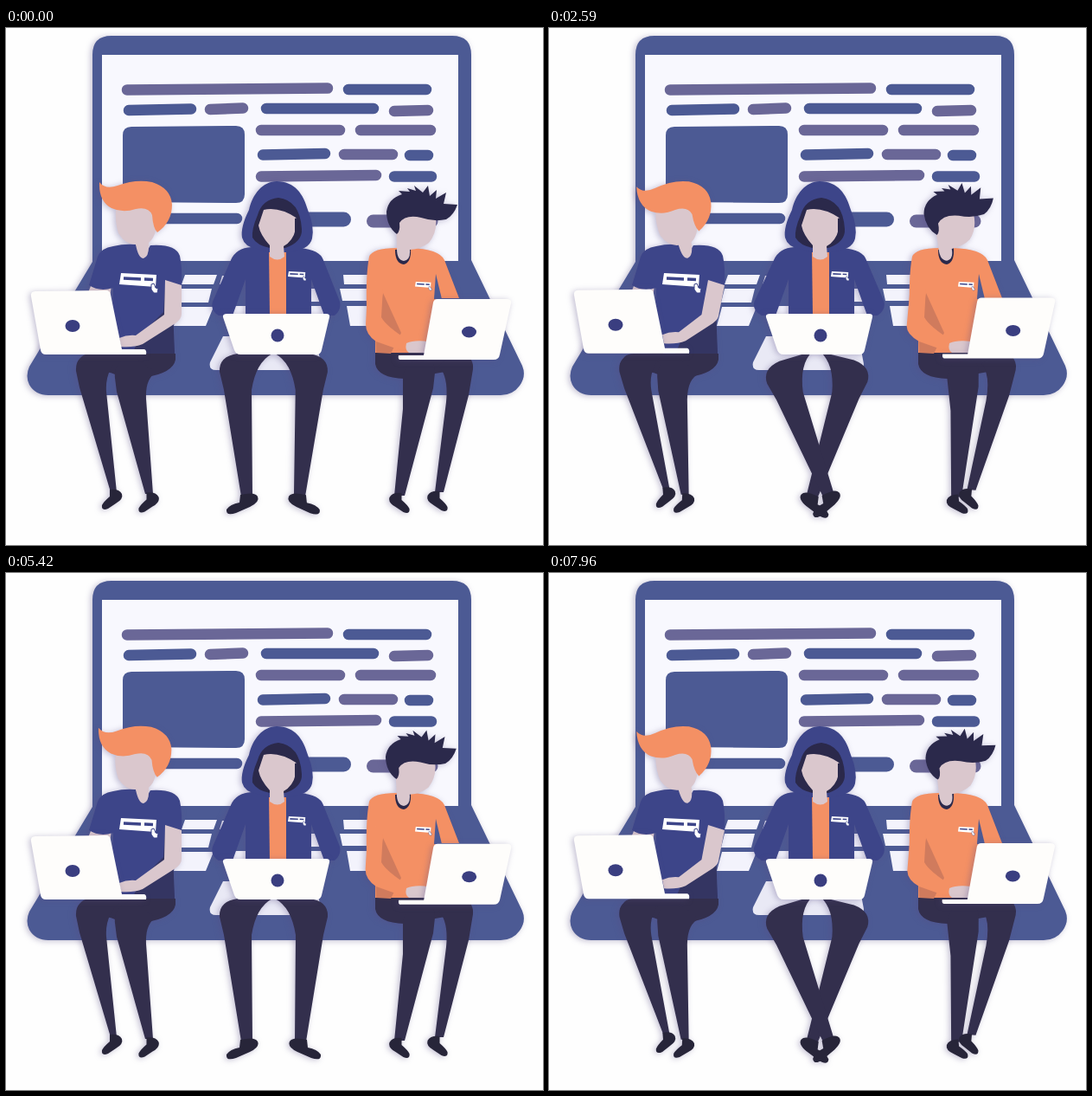
An HTML page that plays this animation: 621x597 px, repeating every 8000 ms.

```html
<!DOCTYPE html>
<html lang="en">
<head>
<meta charset="utf-8">
<title>Three coders on a laptop</title>
<style>
  html, body { margin: 0; width: 100%; height: 100%; overflow: hidden; background: #fefefe; }
  svg { display: block; width: 100vw; height: 100vh; }
  .frame { fill: #4c5a94; }
  .bars { fill: none; stroke: #4c5a94; stroke-width: 12.5; stroke-linecap: round; }
  .bars .soft { stroke: #6a6797; }
  .pants { fill: #332f4d; }
  .shoe { fill: #272539; }
  .skin { fill: #dac7cd; }
  .navy { fill: #3d4589; }
  .orange { fill: #f49064; }
  .dark { fill: #2b294b; }
  .lid { fill: #fefdfb; }
  .disc { fill: #3a3e80; }
  .keys { fill: #f3f3fc; }
  .shadow { filter: drop-shadow(-2px 1px 3.5px rgba(85, 75, 130, .36)); }
</style>
</head>
<body>
<svg viewBox="0 0 621 597" preserveAspectRatio="none">
  <defs>
    <path id="shoe" class="shoe" d="M120 533 Q131 532 134 538 Q136 544 127 549 L118 555 Q110 558 111 551 Q113 547 120 541Z"/>
    <g id="badge">
      <path fill="#fff" d="M2 0 L43 2 L42 16 L0 13Z"/>
      <path stroke="#3d4589" stroke-width="3.5" d="M5 6 L25 7 M29 7 L39 7.5"/>
      <path fill="#fff" stroke="#3d4589" d="M37 13 L40 12 L42 17 L45 18 L44 23 L40 23 L37 19Z"/>
    </g>
    <g id="midLeg">
      <path class="pants" d="M247 397 Q246 379 268 376 H308 Q289 386 284 418 L285 541 H272 L252 418Z"/>
      <path class="shoe" d="M271 539 Q288 535 291 541 Q294 547 282 553 L266 560 Q254 564 255 556 Q259 550 270 548Z"/>
    </g>
  </defs>

  <g class="shadow">
    <path class="frame" d="M100 270 V31 Q100 9 122 9 H516 Q538 9 538 31 V268 L597 390 Q602 402 594 413 Q586 424 572 424 H49 Q34 424 27 412 Q22 402 27 391Z"/>
  </g>
  <path fill="#f8f8fe" d="M111 31 H523 V269 H111Z"/>
  <path class="frame" d="M145 114 L266 113 Q276 113 276 123 V192 Q276 202 266 202 L145 201 Q135 201 135 191 V124 Q135 114 145 114Z"/>
  <g class="bars">
    <path d="M396 71 H486 M142 95 L214 93.500 M301 93 H425 M297 146.500 L369 145 M467 147 H488 M449 171.500 H492 M180 220 H267"/>
    <path class="soft" d="M140 71.500 L372 69.500 M236 94 L274 92.500 M449 96 L488 95 M295 118 H386 M410 118 H491 M391 146 H447 M295 171.500 L428 170"/>
    <path stroke-width="17" d="M340 221 H390.500"/>
    <path class="soft" stroke-width="15" d="M424.500 223 H492"/>
  </g>
  <g class="keys">
    <path d="M207 285 H244 L240 296 H203Z M203 301 H238 L234 317 H199Z M200 322 H240 L231 344 H194Z"/>
    <path d="M250 286 H262 L259 296 H247Z M258 321 H284 V332 H255Z M346 301 H380 V316 H346Z M346 321 H376 V332 H346Z"/>
    <path d="M390 285 H418 V296 H391Z M386 301 H418 V315 H389Z M394 321 H418 V344 H398Z"/>
    <path fill="#e9e9f5" d="M251 356 H358 L364 388 Q364 395 357 395 H243 Q234 395 236 386Z"/>
  </g>

  <!-- left coder -->
  <g class="shadow">
    <path class="pants" d="M84 390 Q84 376 98 376 H196 V383 Q193 398 163 403 L126 400 Q115 394 110 402Z"/>
    <g id="leftLegA">
      <path class="pants" d="M81 396 Q80 378 98 377 H136 Q114 393 116 420 L128 536 H121 L85 415Z"/>
      <use href="#shoe"/>
    </g>
    <g id="leftLegB">
      <path class="pants" d="M126 404 Q124 386 145 378 L174 398 Q161 404 162 428 L170 538 H161 L128 420Z"/>
      <use href="#shoe" x="42.500" y="3.500"/>
    </g>
    <path class="skin" d="M100 293 L122 297 L120 312 L94 308Z"/>
    <path class="navy" d="M124 252 Q136 249 150 250 Q158 268 167 251 Q196 249 201 263 Q204 277 203 298 L190 302 L195 376 H132 L123 326 L124 300 Q108 305 96 297 L106 264 Q110 254 124 252Z"/>
    <path fill="#343562" d="M184 298 L182 328 L156 354 L146 376 H195 L192 298Z"/>
    <use href="#badge" x="131" y="283"/>
    <path class="skin" id="leftArm"/>
    <g id="leftHead">
      <path class="skin" d="M127 210 Q150 202 170 211 L173 234 Q171 243 165 248 Q166 264 159 266 Q153 266 150 250 Q138 250 130 237 Q126 225 127 210Z"/>
      <path class="orange" d="M108 178 Q115 187 129 182 Q150 174 169 178 Q191 185 192 204 Q192 224 175 236 Q170 231 169 216 Q165 206 150 209 Q135 214 122 208 Q107 200 108 178Z"/>
    </g>
  </g>
  <g id="leftLaptop" class="shadow">
    <path class="lid" d="M34 304 L116 303 Q120 303 121 308 L134 371 H160 Q163 372 162 377 H46 Q41 377 40 372 L29 310 Q28 304 34 304Z"/>
    <ellipse class="disc" cx="77" cy="344" rx="8.500" ry="7"/>
  </g>

  <!-- middle coder -->
  <g class="shadow">
    <g transform="translate(619 0) scale(-1 1)"><use href="#midLeg" id="midLegB"/></g>
    <use href="#midLeg" id="midLegA"/>
    <path class="navy" id="jacket"/>
    <path class="orange" d="M304 258 H324 V332 H305Z"/>
    <path class="navy" d="M313 177 C297 177 285 192 281 210 Q271 230 273 242 Q276 253 290 255 L304 259 H324 Q351 257 354 243 Q357 230 349 210 C344 192 334 177 313 177Z"/>
    <path class="dark" d="M315 196 Q296 198 291 216 Q284 232 285 242 Q290 251 305 254 H323 Q343 247 342 232 Q340 199 315 196Z"/>
    <path class="skin" d="M298 210 Q316 206 337 220 L335 232 Q332 246 321 252 L322 264 Q314 271 305 264 V251 Q294 239 292 228Z"/>
    <path class="dark" d="M334 220 L339 218 L338 235 L334 235Z"/>
  </g>
  <use href="#badge" transform="translate(326 281) scale(.47)"/>
  <g class="shadow">
    <path class="lid" d="M256 330 H370 Q375 330 374 334 L365 372 Q364 377 359 377 H271 Q266 377 264 372 L251 334 Q250 330 256 330Z"/>
    <circle class="disc" cx="314" cy="355" r="7.500"/>
  </g>

  <!-- right coder -->
  <g class="shadow">
    <path class="pants" d="M427 374 H525 Q540 378 540 392 L508 397 L461 405 Q430 404 427 388Z"/>
    <g id="rightLegA">
      <path class="pants" d="M459 402 Q462 386 482 379 Q497 384 496 398 L494 416 L461 540 H449 L459 440Z"/>
      <use href="#shoe" transform="translate(577.500 4) scale(-1 1)"/>
    </g>
    <g id="rightLegB">
      <path class="pants" d="M500 390 Q510 379 526 379 Q541 382 540 394 L535 424 L506 536 H496 L509 432 Q512 402 500 390Z"/>
      <use href="#shoe" transform="translate(621.500 2) scale(-1 1)"/>
    </g>
    <path class="orange" d="M451 254 Q424 254 420 264 Q416 285 417 322 L427 340 V375 H490 L500 312 H524 L507 268 Q501 255 467 254Z"/>
    <path class="frame" d="M497 284 L504 313 H495Z"/>
    <path fill="#d07b5d" d="M436 306 L457 352 L445 376 L428 375 L427 350Z"/>
    <path class="orange" id="rightArm"/>
    <path class="skin" d="M463 364 Q472 360 488 362 L486 375 H466 Q461 372 463 364Z"/>
    <path class="dark" d="M450 256 Q450 272 460 273 Q469 271 468 254Z"/>
    <use href="#badge" transform="translate(473 293) scale(.43)"/>
    <g id="rightHead">
      <path class="skin" d="M451 220 Q475 212 497 219 Q499 236 489 248 Q480 255 467 256 Q468 268 460 269 Q452 268 452 255Z"/>
      <path class="dark" d="M452 238 Q440 229 440 212 Q442 197 458 192 L454 188 L467 189 L464 185 L474 188 L472 182 L482 190 L488 182 L490 194 L498 187 L497 197 L509 190 L506 203 L522 204 Q518 216 509 221 Q495 224 480 219 Q462 215 455 225 Q456 235 452 238Z"/>
    </g>
  </g>
  <g id="rightLaptop" class="shadow">
    <path class="lid" d="M499 313 H579 Q585 313 584 318 L571 377 Q570 383 564 383 H456 Q453 383 454 378 H483 L494 317 Q495 313 499 313Z"/>
    <ellipse class="disc" cx="535.500" cy="351" rx="8.500" ry="6.500"/>
  </g>
</svg>
<script>
const LOOP = 8000, HEAD_CYCLE = 6000, LEG_CYCLE = 5400;
const byId = id => document.getElementById(id);
const setTransform = (id, value) => byId(id).setAttribute('transform', value);
const setPath = (id, value) => byId(id).setAttribute('d', value);

// Eased value of a cyclic list of [time, value] keys
function track(time, cycle, keys) {
  const t = time % cycle;
  const next = keys.findIndex(key => key[0] > t);
  if (next < 0) return keys[keys.length - 1][1];
  if (next === 0) return keys[0][1];
  const [t0, v0] = keys[next - 1], [t1, v1] = keys[next];
  const u = (t - t0) / (t1 - t0);
  return v0 + (v1 - v0) * u * u * (3 - 2 * u);
}

// Swings a leg about its knee so that the foot moves by dx pixels
const swing = (id, dx, x, y) => setTransform(id, `rotate(${-dx * .382} ${x} ${y})`);

function draw(t) {
  const leftTilt = track(t, HEAD_CYCLE, [[0, 0], [2100, 1], [3600, 1], [6000, 0]]);
  const rightTilt = track(t, HEAD_CYCLE, [[0, 0], [3700, 1], [5900, 0]]);
  const crossA = track(t, HEAD_CYCLE, [[0, 0], [1350, 1], [2600, 1], [3770, 0]]);
  const crossB = track(t + 100, HEAD_CYCLE, [[0, 0], [1000, 1], [2700, 1], [3870, 0]]);
  const leftSway = track(t, LEG_CYCLE, [[0, 0], [1050, 1], [3620, .9], [4650, 0]]);

  setTransform('leftHead', `rotate(${-5.5 * leftTilt} 158 252)`);
  setTransform('rightHead', `rotate(${-9 * rightTilt} 458 266)`);

  swing('leftLegA', track(t, LEG_CYCLE, [[0, 0], [2600, 12], [3200, 12], [4700, 0]]), 98, 390);
  swing('leftLegB', -9 * leftSway, 145, 390);
  swing('rightLegA', track(t, LEG_CYCLE, [[0, 0], [2000, 16], [2900, 16], [5400, 0]]), 480, 390);
  swing('rightLegB', track(t, LEG_CYCLE, [[0, 0], [700, 4], [2450, -13], [2900, -13], [5400, 0]]), 525, 390);

  setTransform('midLegA', `translate(${3 * crossA} ${8 * crossA}) rotate(${-16.5 * crossA} 268 392)`);
  setTransform('midLegB', `translate(${2 * crossB} ${7 * crossB}) rotate(${-13.5 * crossB} 268 392)`);

  const elbow = 203 - 7 * leftSway, hand = 359 - 4 * leftSway;
  setPath('leftArm', `M184 291 L203 297 L${elbow} 330 Q${elbow} 336 ${elbow - 7} 341
    L158 ${hand + 6} Q148 ${hand + 10} 133 ${hand + 9} L131 ${hand - 1} Q140 ${hand - 5} 150 ${hand - 4} L${elbow - 20} 331Z`);

  const flare = track(t, LEG_CYCLE, [[0, 0], [900, 1.5], [3700, 1.5], [4800, 0]]);
  setPath('jacket', `M284 253 Q266 254 260 268 L${239 - flare} 316 Q${236 - flare} 326 246 332 H262 L277 290 V332 H353 V290
    L368 332 H380 Q${388 + flare} 326 ${386 + flare} 316 L367 268 Q363 256 340 254Z`);

  const drop = 3 * rightTilt;
  setPath('rightArm', `M419 285 L436 300 L434 334 Q440 345 466 361 L462 374 L428 362
    Q${416 - drop} 354 ${416 - drop} ${342 + drop}Z`);

  setTransform('leftLaptop', `translate(0 ${-1.5 * leftTilt * rightTilt})`);
  setTransform('rightLaptop', `translate(${1.5 * rightTilt} ${-2 * rightTilt})`);
}

function tick() {
  draw(performance.now() % LOOP);
  requestAnimationFrame(tick);
}
tick();
</script>
</body>
</html>
```
